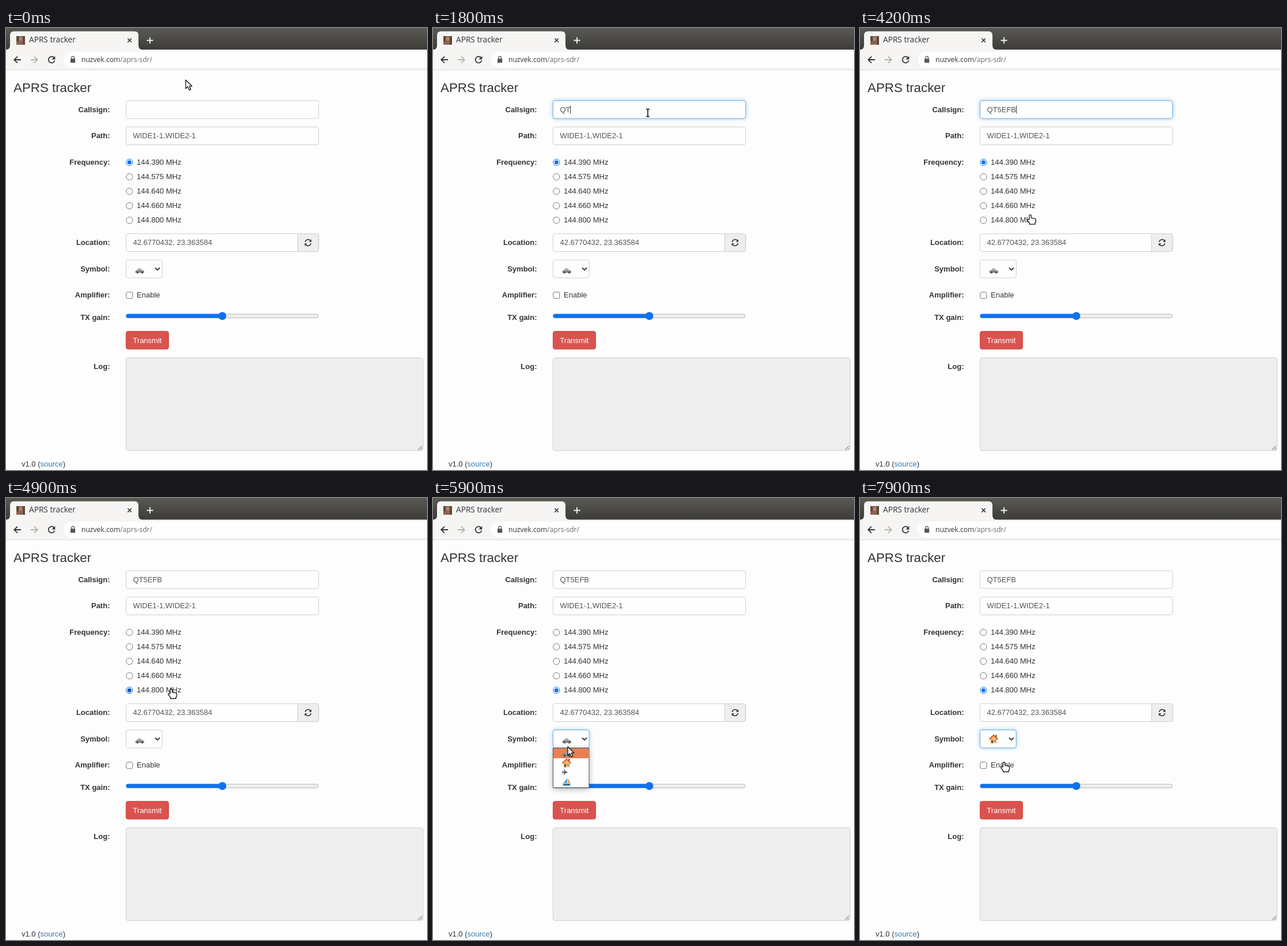
An HTML page that plays this animation: 731 by 766 pixels, repeating every 8000 ms.

```html
<!DOCTYPE html>
<html lang="en">
<head>
<meta charset="utf-8">
<title>APRS tracker</title>
<style>
html, body { margin: 0; width: 100%; height: 100%; overflow: hidden; background: #fdfdfd; }
svg { display: block; width: 731px; height: 766px; }
text { font: 13.02px "Liberation Sans", Arial, sans-serif; fill: #333; white-space: pre; }
.label { font-weight: bold; text-anchor: end; }
.value { fill: #555; }
.chrome { font-family: "Open Sans", sans-serif; }
.field { fill: #fefefe; stroke: #ccc; stroke-width: .93; }
.focus { fill: #fefefe; stroke: #66afe9; stroke-width: .93; filter: drop-shadow(0 0 3.7px rgba(102,175,233,.6)); }
.line { fill: none; stroke: #333; stroke-width: 1.8; }
#menu { filter: drop-shadow(0 2px 5px rgba(0,0,0,.3)); }
</style>
</head>
<body>
<svg viewBox="0 0 731 766">
  <defs>
    <linearGradient id="bar" x2="0" y2="1">
      <stop stop-color="#5a5954"/><stop offset="1" stop-color="#3c3b37"/>
    </linearGradient>
    <g id="car">
      <path d="M-7.500 1.500q0-2 3-2.500l2.500-3h4l3 3q3 .3 3 2.500v1.700h-15.500z" fill="#7f8188"/>
      <path d="M-3-.8l1.500-2H.3v2zM1.200-.8v-2h1.500l2 2z" fill="#c4d5e6"/>
      <circle cx="-3.700" cy="3" r="1.600" fill="#444"/><circle cx="4.500" cy="3" r="1.600" fill="#444"/>
    </g>
    <g id="house">
      <path d="M-5.500 0h11v7.500h-11z" fill="#f1bd6c"/>
      <path d="M3-7h2.500v5H3z" fill="#8d5a41"/>
      <path d="M-7.500 1L0-6.500 7.500 1" fill="#f1bd6c" stroke="#d9582f" stroke-width="2"/>
      <path d="M-4 2h3v5.500h-3z" fill="#8a4a32"/><path d="M1 2h3v3H1z" fill="#5aa7d6"/>
    </g>
    <path id="plane" d="M5 0Q4-1 1.500-.8L-1.500-4.500h-1l1.200 3.700h-2L-4.500-2.200h-.8l.6 2.200-.6 2.200h.8L-3.300.8h2l-1.200 3.700h1L1.500.8Q4 1 5 0z" fill="#4b4560"/>
    <g id="boat">
      <path d="M1-7v9h-7q4-3 7-9z" fill="#4aa3c7"/><path d="M2-5q4 3 4 7H2z" fill="#e0a53c"/>
      <path d="M-7 3H7L5 6H-5z" fill="#3b6c8f"/><path d="M-7 6.300H7" stroke="#5bb5dd" stroke-width="1.300"/>
    </g>
  </defs>

  <!-- browser window -->
  <path d="M0 0H731V38H0z" fill="url(#bar)"/>
  <path d="M0 37.500Q7 37.500 7 30V13Q7 5.800 14 5.800H223Q230 5.800 230 13V30Q230 37.500 237 37.500H731V72.500H0z" fill="#f6f5f3"/>
  <path d="M731 41H114a13.700 13.700 0 0 0 0 27.400H731z" fill="#fefefe"/>
  <path d="M0 72.500H731" stroke="#dcdbda"/>
  <path d="M18 14h15v15H18z" fill="#8c6250"/>
  <path d="M18 14h4v9h-4zM29 14h4v15h-4z" fill="#59493f"/>
  <path d="M23 16h5v6h-5z" fill="#b8846a"/>
  <text class="chrome" x="40" y="25.300" style="font-size:13.7px">APRS tracker</text>
  <path class="line" d="M211.300 18l6.600 6.600m0-6.600l-6.600 6.600" style="stroke-width:1.500"/>
  <path class="line" d="M244.500 21.500h11m-5.500-5.500v11" style="stroke:#f4f4f2"/>
  <path class="line" d="M26 55H14.500m5.500-5.700L14.200 55l5.800 5.700"/>
  <path class="line" d="M43 55h11.500M49 49.300L54.800 55 49 60.700" style="stroke:#b3b2b0"/>
  <path class="line" d="M83.300 51.200a5.500 5.500 0 1 0 1.200 5.300"/>
  <path d="M85.300 48.700v5.800h-5.800z" fill="#333"/>
  <path d="M112 53.200h8.200v7H112z" fill="#555"/>
  <path class="line" d="M113.800 53.500v-2a2.300 2.300 0 0 1 4.600 0v2" style="stroke:#555;stroke-width:1.300"/>
  <text class="chrome" x="131" y="59.400" style="font-size:12.1px">nuzvek.com<tspan fill="#6b6b6b">/aprs-sdr/</tspan></text>

  <!-- form -->
  <text x="13" y="111" style="font-size:22.320px">APRS tracker</text>
  <g id="labels"></g>
  <rect class="field" x="208.400" y="125.900" width="334.400" height="31" rx="3.700"/>
  <rect class="focus" id="callFocus" x="208.400" y="125.900" width="334.400" height="31" rx="3.700"/>
  <text class="value" id="call" x="220.400" y="146"></text>
  <path id="caret" stroke="#333" d="M0 134.500v14"/>
  <rect class="field" x="208.400" y="171.500" width="334.400" height="31" rx="3.700"/>
  <text class="value" x="220.400" y="191">WIDE1-1,WIDE2-1</text>
  <g id="radios"></g>
  <rect class="field" x="208.400" y="356.500" width="334.400" height="31" rx="3.700"/>
  <path d="M506.500 356.500h32.600q3.700 0 3.700 3.700v23.600q0 3.700-3.700 3.700h-32.600z" fill="#eee" stroke="#ccc" stroke-width=".93"/>
  <text class="value" x="220.400" y="376">42.6770432, 23.363584</text>
  <path class="line" d="M519.500 370.800a5.200 5.200 0 0 1 9.200-2.300m.8 4.700a5.200 5.200 0 0 1-9.200 2.300" style="stroke-width:1.500"/>
  <path d="M530.300 366.300v4.400h-4.400zM518.700 377.700v-4.400h4.400z" fill="#333"/>
  <rect class="field" x="208.400" y="402" width="62.800" height="31" rx="3.700"/>
  <rect class="focus" id="selFocus" x="208.400" y="402" width="62.800" height="31" rx="3.700"/>
  <use id="symbol" x="232" y="421"/>
  <path class="line" d="M259 415.500l4 4 4-4"/>
  <rect x="208.800" y="457.800" width="11" height="11" rx="2" fill="#fefefe" stroke="#767676"/>
  <text x="227" y="467">Enable</text>
  <rect x="208.800" y="496" width="333.300" height="6.400" rx="3.200" fill="#efefef" stroke="#b2b2b2" stroke-width=".93"/>
  <rect x="208.400" y="495.600" width="168" height="7" rx="3.500" fill="#0f72ee"/>
  <circle cx="375.600" cy="499.100" r="6.900" fill="#0f72ee"/>
  <rect x="208.400" y="525.600" width="74" height="31" rx="3.700" fill="#d9534f" stroke="#d43f3a" stroke-width=".93"/>
  <text x="245.400" y="545.500" text-anchor="middle" style="fill:#fff">Transmit</text>
  <rect x="208.400" y="571.400" width="515.800" height="161" rx="3.700" fill="#eee" stroke="#ccc" stroke-width=".93"/>
  <path d="M715.500 731l7-7m-3 7l3-3" stroke="#555"/>
  <text x="27" y="760">v1.0 (<tspan fill="#337ab7">source</tspan>)</text>

  <g id="menu">
    <rect x="208.500" y="433.500" width="62.500" height="68.500" fill="#fefefe" stroke="#4f545c"/>
    <rect id="hover" x="209" width="61.500" height="17" fill="#ea8052"/>
    <use href="#car" x="232" y="444"/><use href="#house" x="232" y="459"/>
    <use href="#plane" x="229.500" y="475.300"/><use href="#boat" x="232" y="492"/>
  </g>

  <!-- pointers, hotspot at 0,0 -->
  <g id="pointer" stroke-linejoin="round">
    <path id="arrow" d="M0 0V15l3.600-3.300L6.200 17.600l2.600-1.200L6.300 10.800h4.600z" fill="#fff" stroke="#111" stroke-width="1.300"/>
    <g id="beam" fill="none">
      <path d="M-3-6.500H3M0-6.500V6.500M-3 6.500H3" stroke="#fff" stroke-width="3.600"/>
      <path d="M-3-6.500H3M0-6.500V6.500M-3 6.500H3" stroke="#111" stroke-width="1.600"/>
    </g>
    <path id="hand" d="M-1.800 8V1.700a1.700 1.700 0 0 1 3.400 0V5.500l5.400.8q2.500.5 2.500 2.700v2.500q0 1.500-1.300 2.500v2.500H-1.500V14.300L-5 10q-.8-2 1-2.300z" fill="#fff" stroke="#111" stroke-width="1.300"/>
  </g>
</svg>
<script>
const $ = id => document.getElementById(id);
const show = (id, on) => $(id).style.display = on ? "" : "none";
const clamp = v => Math.max(0, Math.min(1, v));

const LOOP = 8000, STEP = 100;
const CALL = "QT5EFB", KEYS = [1500, 1800, 2800, 2900, 3000, 3100];
const FOCUS = 600, PICK = 4600, OPEN = 5700, CLOSE = 6700;
// time, x, y
const PATH = [
  [0, 312, 90], [100, 312, 90], [600, 374, 143], [700, 375, 144], [1100, 373, 147],
  [3400, 373, 147], [4300, 293, 330], [4700, 287, 331], [5000, 287, 331],
  [5600, 240, 418], [5900, 234, 431], [6300, 235, 456], [6700, 236, 458],
  [7200, 237, 458], [7900, 250, 458], [8000, 250, 458]
];

$("labels").innerHTML = [
  ["Callsign", 146], ["Path", 191], ["Frequency", 237], ["Location", 376],
  ["Symbol", 422], ["Amplifier", 467], ["TX gain", 506], ["Log", 591]
].map(([s, y]) => `<text class="label" x="180.500" y="${y}">${s}:</text>`).join("");

$("radios").innerHTML = [390, 575, 640, 660, 800].map((f, i) => {
  const y = 232.8 + i * 25.1;
  return `<circle class="ring" cx="214.300" cy="${y}" r="5.600" fill="#fefefe"/>
    <circle class="dot" cx="214.300" cy="${y}" r="3.500"/>
    <text x="227" y="${237 + i * 25}">144.${f} MHz</text>`;
}).join("");
const rings = document.querySelectorAll(".ring"), dots = document.querySelectorAll(".dot");

function pointerAt(t) {
  const i = PATH.findIndex(p => p[0] > t);
  const [t0, x0, y0] = PATH[i - 1], [t1, x1, y1] = PATH[i];
  const u = (t - t0) / (t1 - t0), e = u * u * (3 - 2 * u);
  return [x0 + (x1 - x0) * e, y0 + (y1 - y0) * e];
}

function pointerKind(x, y, open) {
  const within = (l, t, r, b) => x >= l && x <= r && y >= t && y <= b;
  if (open) return "arrow";
  if (within(208, 126, 543, 157) || within(208, 171, 543, 203) || within(208, 356, 506, 388)) return "beam";
  if (within(208, 223, 305, 344) || within(208, 453, 268, 473)) return "hand";
  return "arrow";
}

function draw(t) {
  const open = t >= OPEN && t < CLOSE;
  const [x, y] = pointerAt(t), kind = pointerKind(x, y, open);
  $("pointer").setAttribute("transform", `translate(${x} ${y})`);
  for (const k of ["arrow", "beam", "hand"]) show(k, k === kind);

  const typed = KEYS.filter(k => k <= t).length;
  $("call").textContent = CALL.slice(0, typed);
  const since = t - (typed ? KEYS[typed - 1] : FOCUS);
  show("caret", t >= FOCUS && t < PICK && Math.floor(since / 500) % 2 === 0);
  const end = typed ? $("call").getComputedTextLength() : 0;
  $("caret").setAttribute("transform", `translate(${Math.round(220.4 + end) + .5} 0)`);
  $("callFocus").style.opacity = clamp((t - FOCUS) / 150) * clamp(1 - (t - PICK) / 150);

  const chosen = t < PICK ? 0 : 4;
  rings.forEach((ring, i) => {
    const on = i === chosen;
    const blue = i === 4 && kind === "hand" && y < 345 && y > 320 ? "#0a55bd" : "#0f72ee";
    ring.setAttribute("stroke", on ? blue : "#767676");
    dots[i].setAttribute("fill", on ? blue : "none");
  });

  const house = t >= CLOSE;
  $("symbol").setAttribute("href", house ? "#house" : "#car");
  $("symbol").setAttribute("y", house ? 417.5 : 421);
  $("selFocus").style.opacity = clamp((t - OPEN) / 150);
  show("menu", open);
  $("hover").setAttribute("y", 434 + 17 * Math.max(0, Math.floor((y - 434) / 17)));
}

function tick(now) {
  draw(Math.floor(now % LOOP / STEP) * STEP);
  requestAnimationFrame(tick);
}
draw(0);
requestAnimationFrame(tick);
</script>
</body>
</html>
```
